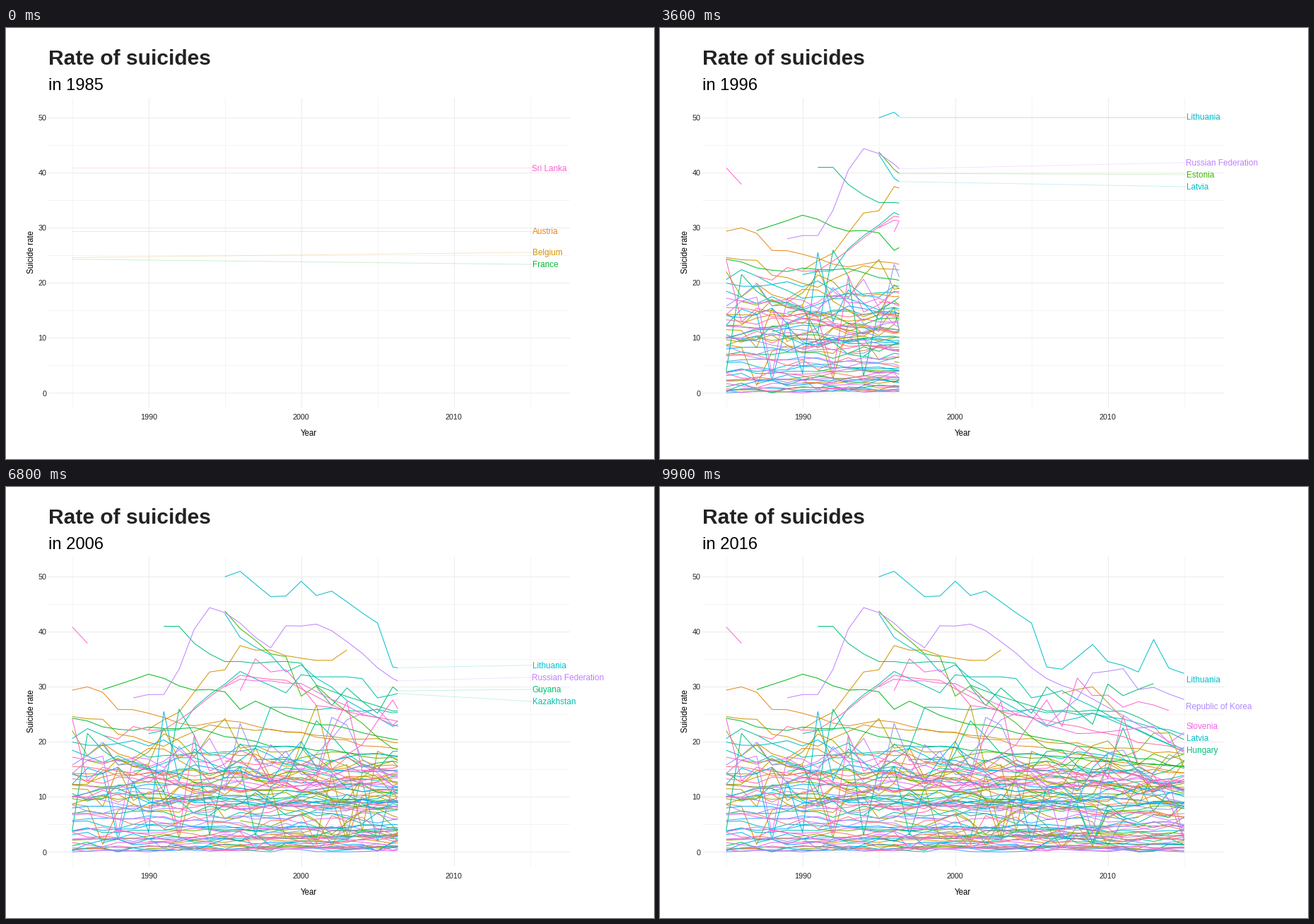
A matplotlib script that plays this animation: 917x611 px, repeating every 10000 ms.

```python
import numpy as np
import matplotlib.pyplot as plt
from matplotlib.animation import FuncAnimation
from matplotlib.collections import LineCollection

W, H, DPI = 917, 611, 64
PX = 72 / DPI                     # points per pixel
FRAMES, FIRST, SPAN = 100, 1985, 31
COUNTRIES = 101
LABEL_X, LABEL_GAP = 744.5, 17.1

plt.rcParams["font.family"] = ["Liberation Sans", "DejaVu Sans"]


def px(year):
    return 93.7 + 21.6 * (np.asarray(year) - FIRST)


def py(rate):
    return 517.3 - 7.8 * np.asarray(rate)


def hue_color(k):
    """Evenly spaced HCL hue (c=100, l=65) for the k-th country."""
    h = np.radians(15 + 360 * (k - 1) / COUNTRIES)
    y = ((65 + 16) / 116) ** 3
    u = 100 * np.cos(h) / (13 * 65) + 0.19784
    v = 100 * np.sin(h) / (13 * 65) + 0.46834
    x = 9 * y * u / (4 * v)
    z = 3 * y / v - x / 3 - 5 * y
    rgb = np.array([3.2405 * x - 1.5371 * y - 0.4985 * z,
                    -0.9693 * x + 1.8760 * y + 0.0416 * z,
                    0.0556 * x - 0.2040 * y + 1.0572 * z]).clip(0, 1)
    return np.where(rgb > 0.00304, 1.055 * rgb ** (1 / 2.4) - 0.055,
                    12.92 * rgb).clip(0, 1)


# ---- data -----------------------------------------------------------------
series = []                       # (country index, name, years, rates)


def lead(k, name, *keys):
    """A named country: straight runs between turning points, slightly rough."""
    at, level = np.array(keys, float).T
    years = np.arange(at[0], at[-1] + 1)
    rough = np.random.RandomState(k).uniform(-0.3, 0.3, len(years))
    rates = np.interp(years, at, level) + np.where(np.isin(years, at), 0, rough)
    series.append((k, name, years, rates))


def wander(k):
    """An unnamed country: a sloping level with yearly noise."""
    rng = np.random.RandomState(k)
    start = 1985 if rng.rand() < 0.55 else rng.randint(1986, 2001)
    end = 2015 if rng.rand() < 0.85 else rng.randint(2005, 2015)
    years = np.arange(start, end + 1)
    level = 20 * (k * 0.618 % 1) ** 1.35
    goal = level * rng.uniform(0.65, 1.35) if level < 12 else level * rng.uniform(0.7, 0.95)
    trend = np.interp(years, [1985, 2015], [level, goal])
    volatile = rng.rand() < 0.25
    noise = rng.normal(size=len(years)) * (0.2 + trend * (0.12 if volatile else 0.035))
    noise[1:] += 0.5 * noise[:-1]
    rates = trend + noise
    if volatile:
        rates *= rng.choice([1, 0.2, 1.5], len(years), p=[0.9, 0.06, 0.04])
    series.append((k, None, years, rates.clip(0)))


lead(7, "Austria", (1985, 29.4), (1986, 30), (1987, 29), (1988, 25.9), (1990, 25.2),
     (1993, 22.9), (1995, 23.9), (2015, 14.3))
lead(12, "Belarus", (1990, 22.3), (1992, 25.4), (1994, 32.7), (1995, 33.1),
     (1996, 37.5), (2001, 34.8), (2002, 34.8), (2003, 36.7))
lead(12, "Belarus", (2007, 28.8), (2009, 30), (2011, 24.2))
lead(13, "Belgium", (1985, 24.6), (1987, 24.1), (1988, 21.4), (1991, 19.2),
     (1994, 23.1), (2015, 17.8))
lead(31, "Estonia", (1995, 43.8), (1996, 40.6), (1998, 36), (1999, 35.5),
     (2000, 28.3), (2001, 30.2), (2006, 18.8), (2015, 15.2))
lead(33, "Finland", (1987, 29.5), (1990, 32.3), (1993, 29.4), (1995, 29.1),
     (1996, 25.9), (1997, 27.4), (2000, 23.9), (2015, 15.5))
lead(34, "France", (1985, 24.3), (1988, 22.3), (1993, 22.6), (1998, 19.2), (2015, 15.6))
lead(40, "Guyana", (2001, 30), (2002, 26.6), (2003, 29.8), (2005, 25.2), (2006, 30),
     (2009, 23.2), (2010, 30.5), (2011, 28.4), (2013, 30.6))
lead(41, "Hungary", (1991, 41), (1992, 41), (1993, 37.9), (1995, 34.6), (2000, 34.3),
     (2001, 30.3), (2006, 25.6), (2011, 25.6), (2016, 19.3))
lead(47, "Japan", (1985, 20.6), (1986, 22.4), (1990, 17.2), (1997, 18.8),
     (1998, 26.3), (2009, 25.2), (2015, 18.7))
lead(48, "Kazakhstan", (1990, 21.5), (1992, 22.2), (1993, 26.2), (1996, 32.8),
     (1999, 28.9), (2000, 32.2), (2004, 31.5), (2005, 28), (2007, 29.3), (2015, 18.1))
lead(52, "Latvia", (1995, 43.3), (1996, 39), (1998, 35.8), (1999, 32.7), (2000, 34),
     (2003, 27.5), (2006, 22.8), (2009, 25.2), (2016, 20.7))
lead(53, "Lithuania", (1995, 50), (1996, 51), (1998, 46.4), (1999, 46.5),
     (2000, 49.2), (2001, 46.6), (2002, 47.4), (2005, 41.6), (2006, 33.6),
     (2007, 33.2), (2009, 37.7), (2010, 34.6), (2012, 32.7), (2013, 38.6),
     (2014, 33.4), (2016, 31.4))
lead(74, "Republic of Korea", (1985, 10), (1990, 8), (1997, 13.7), (1998, 19.5),
     (2000, 14.6), (2003, 24), (2005, 26), (2006, 23), (2008, 27.8), (2009, 32.5),
     (2011, 33.3), (2012, 29.5), (2013, 29.9), (2016, 26.5))
lead(76, "Russian Federation", (1989, 28), (1990, 28.6), (1991, 28.6), (1992, 33.2),
     (1993, 40.5), (1994, 44.4), (1995, 43.5), (1998, 37.1), (1999, 41.1),
     (2001, 41.4), (2002, 40.2), (2006, 31.5), (2009, 27.8), (2015, 18.4))
lead(85, "Slovenia", (1995, 30), (1996, 31.4), (2000, 30.6), (2004, 25), (2008, 21.5),
     (2013, 22.8), (2014, 19.8), (2015, 21.7), (2016, 22.3))
lead(88, "Sri Lanka", (1985, 40.9), (1986, 37.9))
lead(88, "Sri Lanka", (1996, 29.3), (1997, 35.1), (1998, 32.7), (1999, 33.1),
     (2001, 26.6), (2003, 25.6))
lead(89, "Suriname", (1985, 24.2), (1986, 12.9), (1987, 15.4), (1992, 12.8))
lead(89, "Suriname", (1995, 14.6), (2000, 13), (2004, 19.5), (2006, 27.6),
     (2007, 22.8), (2008, 31.6), (2009, 28.4), (2010, 28.5), (2011, 26.3),
     (2012, 27.3), (2014, 25.7))
lead(96, "Ukraine", (1987, 21.2), (1988, 20.5), (1989, 22.8), (1990, 22.1),
     (1991, 22.2), (1996, 32.1), (1999, 31.2), (2003, 25.5), (2015, 18.4))

named = {s[0] for s in series}
for k in range(1, COUNTRIES + 1):
    if k not in named:
        wander(k)
series.sort(key=lambda s: s[0])
colors = [hue_color(s[0]) for s in series]

# ---- stage ----------------------------------------------------------------
fig = plt.figure(figsize=(W / DPI, H / DPI), dpi=DPI, facecolor="white")
ax = fig.add_axes([0, 0, 1, 1])
ax.set_xlim(0, W)
ax.set_ylim(H, 0)
ax.axis("off")


def write(x, y, s, size, color="black", **kw):
    return ax.text(x, y, s, fontsize=size * PX, color=color, **kw)


def grid(years, rates, color):
    for year in years:
        ax.plot([px(year)] * 2, [99, 537], color=color, lw=PX, zorder=1)
    for rate in rates:
        ax.plot([60.2, 796.8], [py(rate)] * 2, color=color, lw=PX, zorder=1)


grid(range(1985, 2016, 10), range(5, 50, 10), "#f4f4f4")
grid(range(1990, 2011, 10), range(0, 51, 10), "#ebebeb")

write(60, 52.3, "Rate of suicides", 30, "#222222", weight="bold")
subtitle = write(60, 88, "", 23.7)
for year in range(1990, 2011, 10):
    write(px(year), 555, str(year), 10.7, "#222222", ha="center")
for rate in range(0, 51, 10):
    write(57.5, py(rate) + 4.2, str(rate), 10.7, "#222222", ha="right")
write(428.3, 578.5, "Year", 11.5, ha="center")
write(35.8, 318, "Suicide rate", 11.5, rotation=90, ha="center", va="center")

lines = LineCollection([], linewidths=PX, zorder=3)
leaders = LineCollection([], linewidths=0.95 * PX, zorder=2)
ax.add_collection(lines, autolim=False)
ax.add_collection(leaders, autolim=False)
labels = [write(LABEL_X, 0, "", 11.7, zorder=4) for _ in range(5)]

# ---- motion ---------------------------------------------------------------
# every year lands on a whole frame
marks = np.round(np.arange(SPAN + 1) * (FRAMES - 1) / SPAN)


def spread(ys):
    """Push sorted label heights apart to the minimum gap."""
    blocks = []
    for i, y in enumerate(ys):
        total, n = y - i * LABEL_GAP, 1
        while blocks and blocks[-1][0] / blocks[-1][1] > total / n:
            t0, n0 = blocks.pop()
            total, n = total + t0, n + n0
        blocks.append((total, n))
    flat = [t / n for t, n in blocks for _ in range(n)]
    return [y + i * LABEL_GAP for i, y in enumerate(flat)]


def revealed(years, rates, now):
    seen = years <= now
    x, y = years[seen], rates[seen]
    if years[0] < now < years[-1]:
        x, y = np.append(x, now), np.append(y, np.interp(now, years, rates))
    shown = x <= 2015
    return np.column_stack([px(x[shown]), py(y[shown])])


def leading(now, count):
    """Highest named countries of the current year, top of the stage first."""
    low, high = np.floor(now), np.ceil(now)
    alive = [(rates[int(low - years[0])], name, np.interp(now, years, rates), color)
             for (_, name, years, rates), color in zip(series, colors)
             if name and years[0] <= low and high <= years[-1]]
    top = sorted(alive, key=lambda a: -a[0])[:count]
    return sorted(top, key=lambda a: -a[2])


def update(i):
    now = FIRST + np.interp(i, marks, np.arange(SPAN + 1))
    subtitle.set_text(f"in {round(FIRST + SPAN * i / (FRAMES - 1))}")

    paths, tints = [], []
    for (_, _, years, rates), color in zip(series, colors):
        path = revealed(years, rates, now)
        if len(path) > 1:
            paths.append(path)
            tints.append(color)
    lines.set_segments(paths)
    lines.set_color(tints)

    top = leading(now, 5 if now > 2015 else 4)
    heights = spread([py(a[2]) for a in top])
    links, tints = [], []
    for label in labels:
        label.set_text("")
    for label, (_, name, rate, color), y in zip(labels, top, heights):
        label.set_text(name)
        label.set_color(color)
        label.set_y(y + 4.3)
        if now < 2015:
            links.append([(px(now), py(rate)), (LABEL_X, y)])
            tints.append((*color, 0.22))
    leaders.set_segments(links)
    leaders.set_color(tints)
    return [subtitle, lines, leaders, *labels]


anim = FuncAnimation(fig, update, frames=FRAMES, interval=100, repeat=True,
                     repeat_delay=0, blit=False)
plt.show()
```
